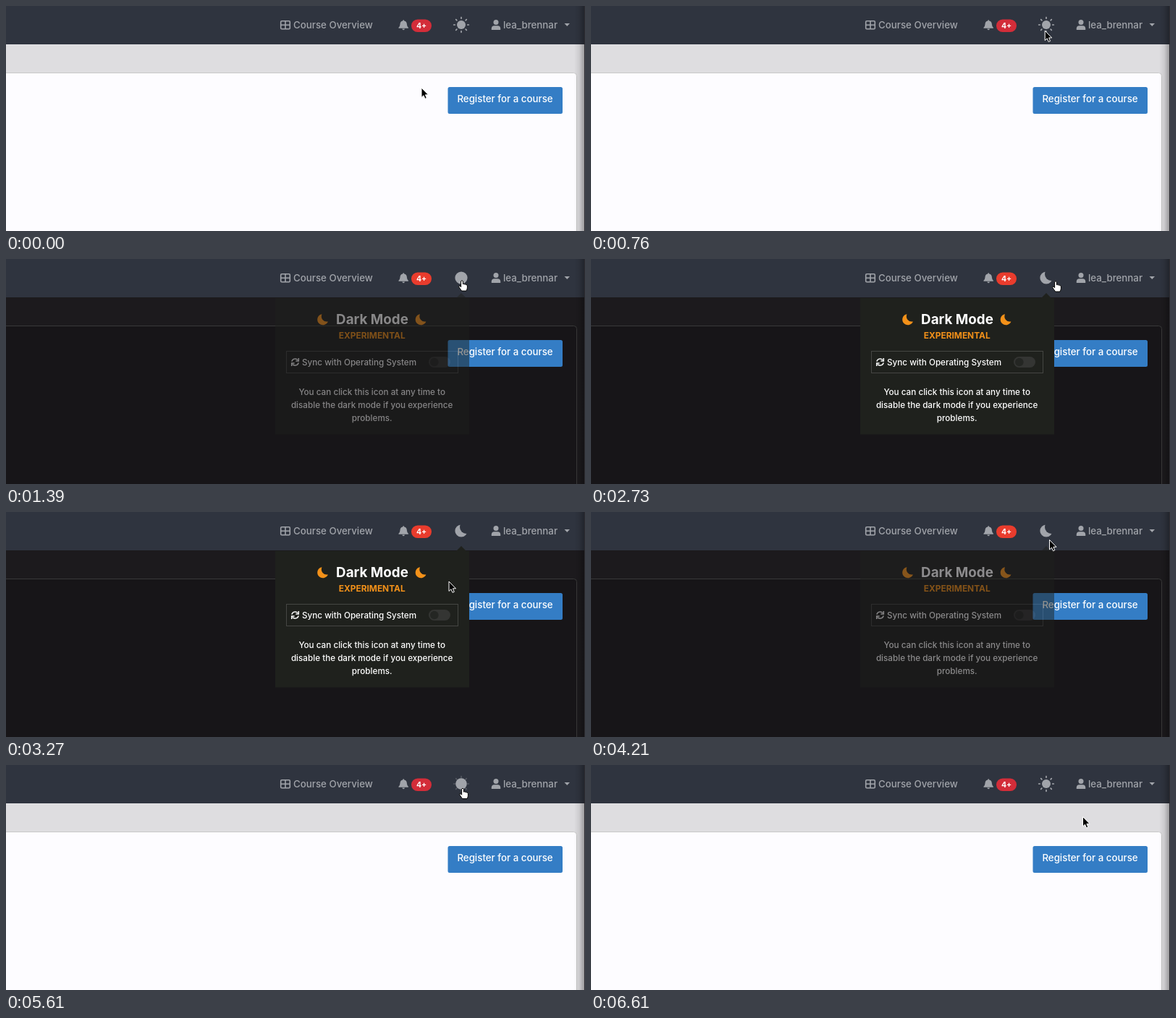
Animation of 800 by 311 pixels, one loop 6790 ms. Source, as an HTML page:

```html
<!DOCTYPE html>
<html lang="en">
<head>
<meta charset="utf-8">
<title>Dark mode toggle</title>
<style>
  html, body { margin: 0; width: 100%; height: 100%; overflow: hidden; background: #171518; }
  svg { display: block; width: 100%; height: 100%; }
  text { font: 500 13.3px Inter, "Open Sans", sans-serif; }
  .nav { fill: #a1a4aa; }
  #popover text { font-size: 11.7px; fill: #fff; }
  #popover .title { font-size: 18.8px; font-weight: 700; }
  #popover .tag { font-size: 11.9px; font-weight: 700; fill: #f39119; }
  .mid { text-anchor: middle; }
</style>
</head>
<body>
<svg viewBox="0 0 800 311" preserveAspectRatio="none">
  <defs>
    <linearGradient id="edge">
      <stop offset="0" stop-opacity="0"/>
      <stop offset=".5" stop-opacity=".08"/>
      <stop offset="1" stop-opacity=".3"/>
    </linearGradient>
    <mask id="bite" maskUnits="userSpaceOnUse" x="-14" y="-14" width="28" height="28">
      <rect x="-14" y="-14" width="28" height="28" fill="#fff"/>
      <circle id="biteDisc" r="9"/>
    </mask>
    <path id="crescent" d="M-1-7.6A7.6 7.6 0 1 0 7.4 2.6A7.4 7.4 0 0 1-1-7.6Z"/>
    <path id="syncArrow" d="M-4.6-.8A4.7 4.7 0 0 1 3.5-3M4.8-5.4V-1.5H.9"/>
  </defs>

  <rect id="page" width="800" height="311"/>
  <rect id="card" x="-10.5" y="92.5" width="799" height="240" rx="4"/>
  <rect width="800" height="53" fill="#2f343f"/>

  <g class="nav">
    <path d="M381 20.7h10q1.3 0 1.3 1.3v8.5q0 1.3-1.3 1.3h-10q-1.3 0-1.3-1.3V22q0-1.3 1.3-1.3ZM386 20.7v11M379.7 26.2h12.6"
      fill="none" stroke="#a1a4aa" stroke-width="1.6"/>
    <text x="397" y="31">Course Overview</text>
    <path d="M549.2 19.2q.9 0 .9 1.2 3.7.8 3.8 4.8.1 3 2 4.6v1h-13.4v-1q1.9-1.6 2-4.6.1-4 3.8-4.8 0-1.2.9-1.2ZM547.4 31.5h3.6q-.2 1.7-1.8 1.7t-1.8-1.7Z"/>
    <circle cx="677" cy="22.5" r="3.5"/>
    <path d="M670.8 33v-1.700q0-4 4-4h4.400q4 0 4 4V33Z"/>
    <text x="687" y="31">lea_brennar</text>
    <path d="M771.500 24h7.500l-3.750 4Z"/>
  </g>
  <rect id="badge" x="560" y="18.500" width="28" height="17.500" rx="8.750"/>
  <text class="mid" x="574" y="31.300" fill="#fff" style="font-size:10.500px;font-weight:700">4+</text>

  <g transform="translate(629 26)" fill="#a1a4aa">
    <circle id="disc" mask="url(#bite)"/>
    <g id="rays" stroke="#a1a4aa" stroke-width="1.700" stroke-linecap="round"></g>
  </g>

  <rect x="610.500" y="112" width="158.500" height="37" rx="2.500" fill="#347dc5"/>
  <text class="mid" x="689.500" y="133.300" fill="#fff">Register for a course</text>
  <rect x="785" width="14" height="311" fill="url(#edge)"/>
  <rect x="799" width="1" height="311" fill="#2d2c31"/>

  <g id="popover">
    <path d="M372 54h250l7-7 7 7h4v188.500H372Z" fill="#1f211d"/>
    <g fill="#f39119">
      <use href="#crescent" x="437.500" y="83.800"/>
      <use href="#crescent" x="573" y="83.800"/>
    </g>
    <text class="title mid" x="506" y="90">Dark Mode</text>
    <text class="tag mid" x="505.700" y="110">EXPERIMENTAL</text>
    <rect x="387.500" y="127.500" width="237" height="30" fill="none" stroke="#454643"/>
    <g transform="translate(399.500 142.500)" fill="none" stroke="#fff" stroke-width="1.500">
      <use href="#syncArrow"/>
      <use href="#syncArrow" transform="rotate(180)"/>
    </g>
    <text x="409" y="147">Sync with Operating System</text>
    <rect x="584" y="135" width="30" height="15" rx="7.500" fill="#343533"/>
    <circle cx="591.800" cy="142.500" r="5.800" fill="#242623"/>
    <text class="mid" x="505.700" y="188">You can click this icon at any time to</text>
    <text class="mid" x="505.700" y="206">disable the dark mode if you experience</text>
    <text class="mid" x="505.700" y="224">problems.</text>
  </g>

  <g id="pointer">
    <path id="arrow" d="M0 0V13.400L3 10.700 5 15.300 7.300 14.300 5.400 9.800H9.500Z" fill="#000" stroke="#fff"/>
    <path id="hand" d="M-1.400 1.200Q0-.8 1.400 1.200V5.200Q2.800 4.200 3.600 5.600 5 4.800 5.600 6.200 7.200 5.600 7.400 7.400V10.400Q7.200 12.600 6 14.600H-.4Q-2 12.400-4.200 9.200-4.800 7.400-3 7.600L-1.400 9.200Z"
      fill="#fff" stroke="#000"/>
  </g>
</svg>
<script>
  const LOOP = 6790;
  const $ = id => document.getElementById(id);
  const set = (id, attrs) => {
    for (const name in attrs) $(id).setAttribute(name, attrs[name]);
  };
  const ramp = (t, from, to) => Math.min(1, Math.max(0, (t - from) / (to - from)));
  const smooth = p => p * p * (3 - 2 * p);
  const lerp = (a, b, p) => a + (b - a) * p;
  const mix = (a, b, p) => `rgb(${a.map((v, i) => Math.round(lerp(v, b[i], p)))})`;

  // Pointer stops: time, x, y
  const stops = [
    [0, 574, 113], [880, 630, 30], [1390, 630, 29.5], [1500, 630, 29.5],
    [1850, 640, 30], [2000, 640, 30], [2060, 642, 30.5], [2730, 642, 30.5],
    [3270, 612, 96], [3850, 612, 96], [4200, 633.5, 38.5], [4580, 633.5, 38.5],
    [4730, 631, 32], [5600, 631, 32], [6610, 679.5, 71.5], [LOOP, 679.5, 71.5]
  ];

  function pointerAt(t) {
    const i = Math.max(1, stops.findIndex(s => s[0] > t));
    const [a, b] = [stops[i - 1], stops[i]];
    const p = smooth(ramp(t, a[0], b[0]));
    return [lerp(a[1], b[1], p), lerp(a[2], b[2], p)];
  }

  for (let i = 0; i < 8; i++) {
    const ray = document.createElementNS("http://www.w3.org/2000/svg", "path");
    ray.setAttribute("d", "M0-8.700V-10.300");
    ray.setAttribute("transform", `rotate(${i * 45})`);
    $("rays").append(ray);
  }

  function draw(t) {
    const dark = ramp(t, 970, 1370) - ramp(t, 5000, 5400);
    const moon = smooth(ramp(t, 1400, 1840)) - smooth(ramp(t, 5210, 5600));
    const rays = 1 - ramp(t, 1000, 1340) + ramp(t, 5480, 5900);
    const open = ramp(t, 1320, 1470) - ramp(t, 4130, 4290);

    set("page", { fill: mix([222, 221, 224], [28, 26, 29], dark) });
    // The outline passes through dark red on the way to the dark theme only
    const red = t < 3000 ? 1 - Math.abs(2 * dark - 1) : 0;
    const line = lerp(200, 57, dark);
    set("card", {
      fill: mix([253, 252, 255], [23, 21, 24], dark),
      stroke: mix([line, line, line], [82, 36, 46], red)
    });
    set("badge", { fill: mix([211, 45, 57], [233, 60, 45], dark) });

    set("disc", { r: lerp(8.6, 6, rays) });
    set("rays", { opacity: rays });
    set("biteDisc", { cx: lerp(21, 7, moon), cy: lerp(-19, -5, moon) });
    set("popover", { opacity: open });

    const [x, y] = pointerAt(t);
    const isHand = t > 840 && t < 2850 || t > 4600 && t < 5870;
    set("pointer", { transform: `translate(${x.toFixed(2)} ${y.toFixed(2)})` });
    set("hand", { visibility: isHand ? "visible" : "hidden" });
    set("arrow", { visibility: isHand ? "hidden" : "visible" });
  }

  const start = performance.now();
  function tick() {
    draw((performance.now() - start) % LOOP);
    requestAnimationFrame(tick);
  }
  tick();
</script>
</body>
</html>
```
